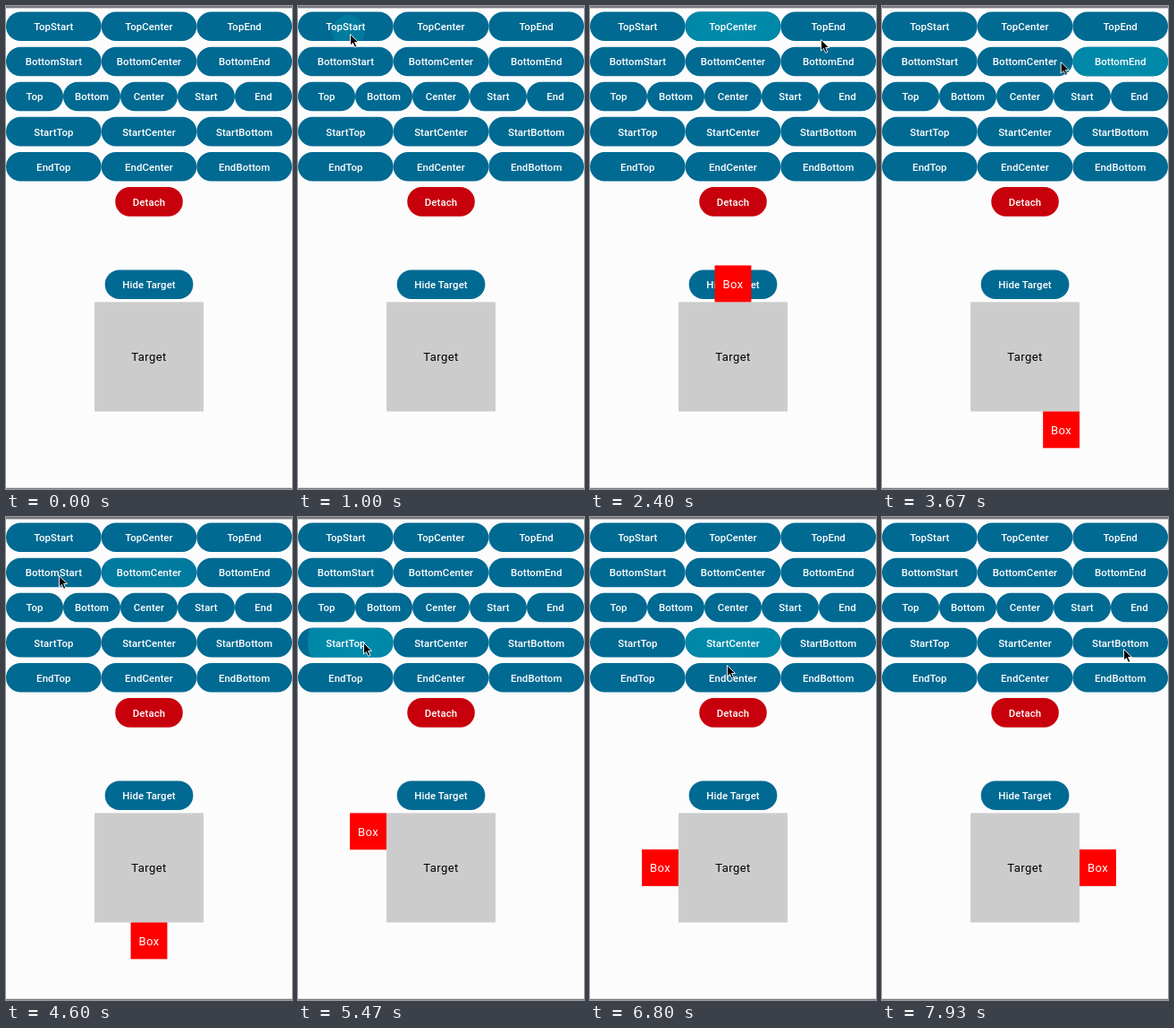
An HTML page for the animation above (8000 ms loop, 320 by 539 pixels).

```html
<!DOCTYPE html>
<html lang="en">
<head>
<meta charset="utf-8">
<title>Popup anchor demo</title>
<style>
  html, body { margin: 0; width: 100%; height: 100%; overflow: hidden; background: #fcfcfc; }
  /* laid out in device pixels (2.75 per dp), then scaled to the 320px stage */
  #stage {
    position: absolute; left: 0; top: 0; width: 1080px; height: 1819px; overflow: hidden;
    transform: scale(.296296); transform-origin: 0 0;
    font-family: Roboto, Arial, sans-serif; text-align: center;
  }
  #stage > * { position: absolute; }
  .bar { left: 0; width: 1080px; background: #76767d; }
  .button {
    height: 110px; border-radius: 55px; overflow: hidden;
    background: #006a92; color: #fff; white-space: nowrap;
    font-size: 38.5px; font-weight: 500; line-height: calc(110px + .1em); letter-spacing: .275px;
  }
  .button span { position: relative; }
  .centered { left: 540px; padding: 0 66px; transform: translateX(-50%); }
  .danger { background: #c8000c; }

  .ripple {
    position: absolute; left: 50%; top: 50%; width: 418px; height: 418px;
    margin: -209px; border-radius: 50%; opacity: 0;
    background: radial-gradient(#008dab, #0084a5);
    animation: grow 8s linear var(--press) infinite, glow 8s linear var(--press) infinite;
  }
  @keyframes grow {
    0% { transform: translate(var(--dx), var(--dy)) scale(.16); }
    3.125%, 100% { transform: none; }
  }
  @keyframes glow {
    0% { opacity: 0; }
    .8% { opacity: .9; }
    2%, 5.8% { opacity: 1; }
    10%, 100% { opacity: 0; }
  }

  .target, .box { font-size: 44px; letter-spacing: 1.375px; }
  .target {
    left: 334px; top: 1115px; width: 412px; height: 412px;
    line-height: calc(412px + .1em); background: #ccc; color: #000;
  }
  .box {
    width: 138px; height: 138px; line-height: calc(138px + .1em);
    background: #f00; color: #fff; animation: place 8s step-end infinite;
  }
  @keyframes place {
    0% { visibility: hidden; left: 334px; top: 977px; }
    13.375% { visibility: visible; left: 334px; top: 977px; }
    26.75% { left: 471px; top: 977px; }
    33.625% { left: 608px; top: 977px; }
    43% { left: 608px; top: 1527px; }
    51.25% { left: 471px; top: 1527px; }
    60.375% { left: 334px; top: 1527px; }
    67.5% { left: 196px; top: 1115px; }
    75.125% { left: 746px; top: 1115px; }
    81.625% { left: 196px; top: 1252px; }
    90.125%, 100% { visibility: visible; left: 746px; top: 1252px; }
  }

  .cursor {
    position: absolute; left: .6px; top: .8px; width: 12px; height: 18px; overflow: visible;
    animation: wander 8s ease-in-out infinite;
  }
  @keyframes wander {
    0%, .9% { transform: translate(326px, 372px); }
    10.5%, 14.1% { transform: translate(57px, 30px); }
    23.1%, 26.6% { transform: translate(158px, 28px); }
    30%, 33.5% { transform: translate(257px, 36px); }
    40.6% { transform: translate(262px, 66px); }
    43.1% { transform: translate(262px, 66px); animation-timing-function: ease-in; }
    45.875% { transform: translate(199px, 61px); animation-timing-function: ease-out; }
    48.1%, 51.5% { transform: translate(160px, 62px); }
    56.5%, 60.6% { transform: translate(58px, 64px); }
    65.4%, 68.8% { transform: translate(72px, 139px); }
    73.1%, 75.4% { transform: translate(58px, 180px); }
    79.4%, 82% { transform: translate(150px, 141px); }
    85% { transform: translate(152px, 164px); }
    88.1%, 90.6% { transform: translate(155px, 178px); }
    97.5%, 100% { transform: translate(269px, 146px); }
  }
</style>
</head>
<body>
<div id="stage">
  <div class="bar" style="top:0;height:8px"></div>
  <div class="bar" style="top:1815px;height:4px"></div>
  <div class="target">Target</div>
  <div class="box">Box</div>
</div>
<svg class="cursor" viewBox="0 0 12 18">
  <path d="M.5.5V13L3.4 10.4 5.6 15.3 7.8 14.3 5.6 9.5H9.5Z"
    fill="#000" stroke="#fff" stroke-width=".9" stroke-linejoin="round"/>
</svg>
<script>
  const stage = document.getElementById('stage');
  const target = document.querySelector('.target');
  const zoom = 1080 / 320;
  const rows = [
    'TopStart TopCenter TopEnd',
    'BottomStart BottomCenter BottomEnd',
    'Top Bottom Center Start End',
    'StartTop StartCenter StartBottom',
    'EndTop EndCenter EndBottom'
  ];
  // label: [press time in ms, pointer x, pointer y]
  const presses = {
    TopStart: [960, 57, 30], TopCenter: [2030, 158, 28], TopEnd: [2580, 257, 36],
    BottomEnd: [3330, 262, 66], BottomCenter: [3990, 160, 62], BottomStart: [4720, 58, 64],
    StartTop: [5290, 72, 139], EndTop: [5900, 58, 180],
    StartCenter: [6420, 150, 141], EndCenter: [7100, 155, 178]
  };

  function addButton(label, top, kind = '') {
    const button = document.createElement('div');
    const text = document.createElement('span');
    button.className = `button ${kind}`;
    button.style.top = `${top}px`;
    text.textContent = label;
    button.append(text);
    stage.insertBefore(button, target);
    return button;
  }

  function addRipple(button, [time, x, y], centerX, centerY) {
    const ripple = document.createElement('i');
    ripple.className = 'ripple';
    ripple.style.setProperty('--press', `${time}ms`);
    ripple.style.setProperty('--dx', `${x * zoom - centerX}px`);
    ripple.style.setProperty('--dy', `${y * zoom - centerY}px`);
    button.prepend(ripple);
  }

  rows.forEach((row, r) => {
    const labels = row.split(' ');
    const width = 1080 / labels.length;
    const top = 22 + r * 132;
    labels.forEach((label, i) => {
      const button = addButton(label, top);
      button.style.left = `${i * width}px`;
      button.style.width = `${width}px`;
      if (presses[label]) addRipple(button, presses[label], (i + .5) * width, top + 55);
    });
  });
  addButton('Detach', 682, 'centered danger');
  addButton('Hide Target', 994, 'centered');
</script>
</body>
</html>
```
